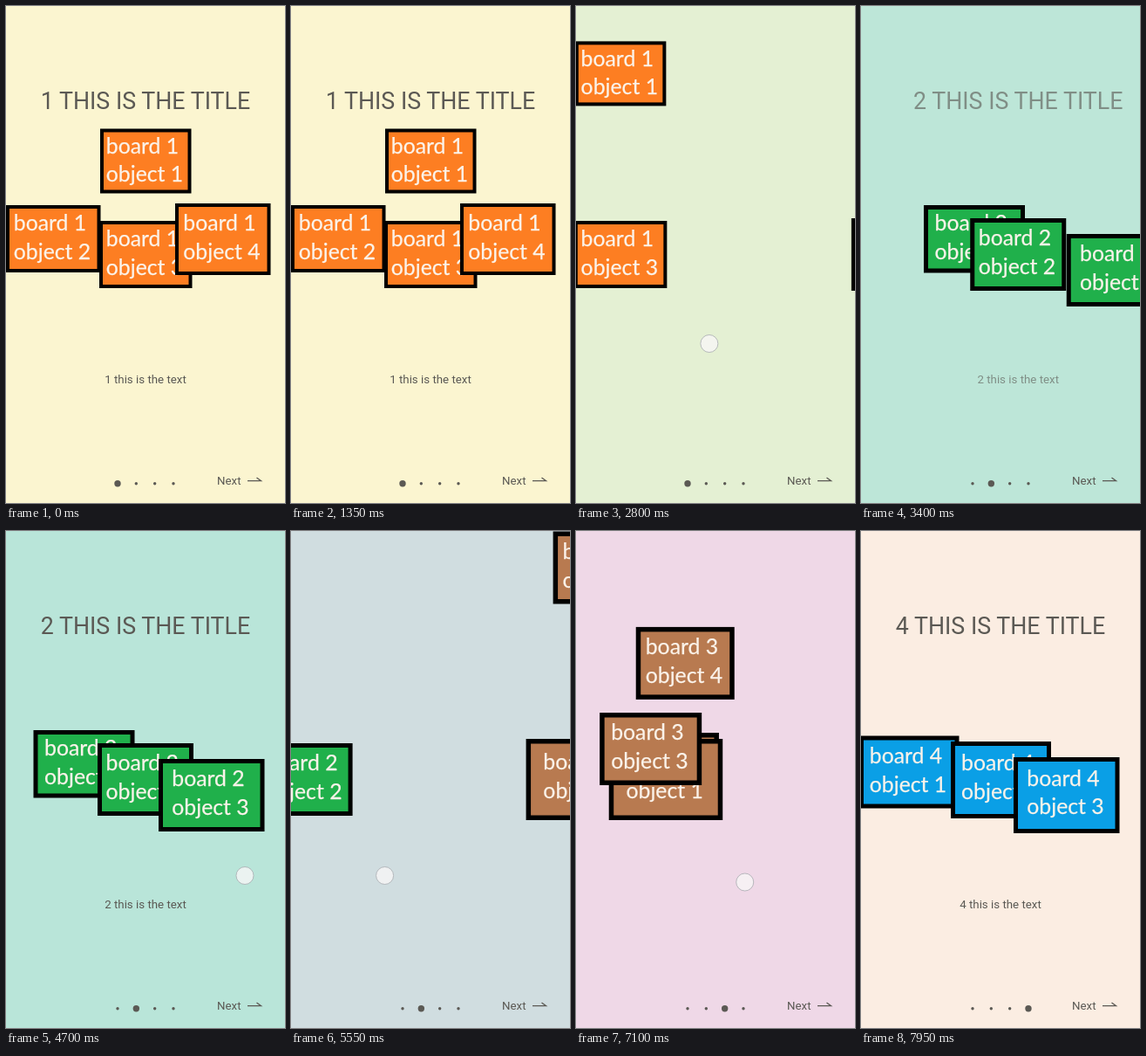
An HTML page that plays this animation: 320 px wide and 569 px high, repeating every 8 s.

```html
<!DOCTYPE html>
<html lang="en">
<head>
<meta charset="utf-8">
<title>Onboarding boards</title>
<style>
  html, body { margin: 0; width: 100%; height: 100%; overflow: hidden; }
  svg { display: block; width: 100%; height: 100%; }
  text { white-space: pre; }
  .label { font-family: Lato, Inter, sans-serif; font-size: 24.8px; fill: #fbf3ea; stroke: #fbf3ea; stroke-width: .25px; }
  .title, .text, .next { font-family: Roboto, sans-serif; font-size: 13.3px; fill: #5b5954; }
  .title { font-size: 26.8px; }
  .title, .text { text-anchor: middle; }
</style>
</head>
<body>
<svg id="stage" viewBox="0 0 320 569" preserveAspectRatio="none"></svg>
<script>
const LOOP = 8000, WIDTH = 320, RISE = 0.917, SLOP = 22, SETTLE = 600, INK = '#5b5954';
const stage = document.getElementById('stage');

// speed: horizontal parallax factor; z: paint order when it is not the list order
const box = (x, y, w, h, speed, z = 0) => ({ x, y, w, h, speed, z });
const boards = [
  { bg: [251, 245, 208], fill: '#fd7e22', edge: 4, boxes: [
    box(108, 140.5, 104.5, 74, 1), box(0, 228, 108.5, 77, 2),
    box(107, 246, 106.5, 77, 1), box(194, 226, 109.5, 82, 3)] },
  { bg: [185, 229, 217], fill: '#20b04b', edge: 5, boxes: [
    box(31.5, 228, 116, 77.5, 2), box(105, 243, 110, 83, 1), box(175, 261, 121.5, 83, 3)] },
  { bg: [236, 212, 232], fill: '#b87a50', edge: 5.5, boxes: [
    box(94, 238, 130.5, 93, 1), box(161, 231, 115.5, 83, 2, -1),
    box(196, 208, 117, 83, 3), box(125, 161.5, 113, 83, 1)] },
  { bg: [251, 237, 226], fill: '#0a9fe6', edge: 5, boxes: [
    box(-2, 234.5, 114.5, 83, 2), box(103, 241, 115, 88, 1), box(175, 259, 121.5, 87, 3)] }
];

// The finger moves left by reach * u^power until its release
const swipes = [
  { start: 1700, release: 3200, x: 284, y: 386.5, reach: 186.3, power: 1.135 },
  { start: 4700, release: 5650, x: 274, y: 394.5, reach: 212, power: 2.2 },
  { start: 6650, release: 7350, x: 272, y: 402, reach: 172.7, power: 1.8 }
];

function add(parent, tag, attrs, content) {
  const el = document.createElementNS('http://www.w3.org/2000/svg', tag);
  for (const key in attrs) el.setAttribute(key, attrs[key]);
  if (content) el.textContent = content;
  return parent.appendChild(el);
}

function addBox(parent, item, board, object, { fill, edge }) {
  const { x, y, w, h } = item;
  const left = x + w / 2 - 45.5, base = y + 0.35 * h + 2.3;
  item.lift = y < 200 ? RISE : 0;
  item.el = add(parent, 'g', {});
  add(item.el, 'rect', { x, y, width: w, height: h });
  add(item.el, 'rect', { x: x + edge, y: y + edge, width: w - 2 * edge, height: h - 2 * edge, fill });
  add(item.el, 'text', { class: 'label', x: left, y: base }, `board ${board}`);
  add(item.el, 'text', { class: 'label', x: left, y: base + 32.7 }, `object ${object}`);
}

const backdrop = add(stage, 'rect', { width: 320, height: 569 });

boards.forEach((board, i) => {
  const n = i + 1;
  board.group = add(stage, 'g', {});
  board.copy = add(board.group, 'g', {});
  add(board.copy, 'text', { class: 'title', x: 160, y: 118 }, `${n} THIS IS THE TITLE`);
  add(board.copy, 'text', { class: 'text', x: 160, y: 432 }, `${n} this is the text`);
  board.boxes.forEach((item, k) => { item.object = k + 1; });
  board.boxes.sort((a, b) => a.z - b.z);
  board.boxes.forEach(item => addBox(board.group, item, n, item.object, board));
});

const dots = boards.map((_, i) =>
  add(stage, 'circle', { cx: 128 + i * 21.33, cy: 546.8, fill: INK }));
add(stage, 'text', { class: 'next', x: 242, y: 547.8 }, 'Next');
add(stage, 'path', { d: 'M277 543.7H292.5L287.5 540', fill: 'none', stroke: INK, 'stroke-width': 1.3 });
const finger = add(stage, 'circle', {
  r: 10, fill: '#f7f6f6', 'fill-opacity': 0.8, stroke: '#a9abb0', 'stroke-width': 0.8
});

function stateAt(t) {
  let page = 0, selected = 0, touch = null;
  for (const { start, release, x, y, reach, power } of swipes) {
    if (t < start) break;
    const u = Math.min(1, (t - start) / (release - start));
    const d = reach * u ** power;
    const drag = Math.max(0, d - SLOP) / WIDTH;
    if (t < release) {
      page += drag;
      touch = [x - d, y];
      break;
    }
    const k = Math.min(1, (t - release) / SETTLE);
    page += 1 - (1 - drag) * (1 - k) ** 5;
    selected++;
  }
  return { page, selected, touch };
}

function draw(t) {
  const { page, selected, touch } = stateAt(t);
  const i = Math.min(boards.length - 2, Math.floor(page)), f = page - i;
  const mix = boards[i].bg.map((c, k) => Math.round(c + (boards[i + 1].bg[k] - c) * f));
  backdrop.setAttribute('fill', `rgb(${mix})`);

  boards.forEach((board, n) => {
    const off = (n - page) * WIDTH, far = Math.abs(off);
    board.group.setAttribute('display', far < WIDTH ? 'inline' : 'none');
    board.copy.setAttribute('transform', `translate(${off} 0)`);
    board.copy.setAttribute('opacity', Math.max(0, 1 - 6 * far / WIDTH));
    for (const { el, speed, lift } of board.boxes) {
      el.setAttribute('transform', `translate(${off * speed} ${-lift * far})`);
    }
  });

  dots.forEach((dot, n) => dot.setAttribute('r', n === selected ? 3.7 : 1.7));
  finger.setAttribute('display', touch ? 'inline' : 'none');
  if (touch) finger.setAttribute('transform', `translate(${touch})`);
}

const began = performance.now();
function tick() {
  draw((performance.now() - began) % LOOP);
  requestAnimationFrame(tick);
}
tick();
</script>
</body>
</html>
```
